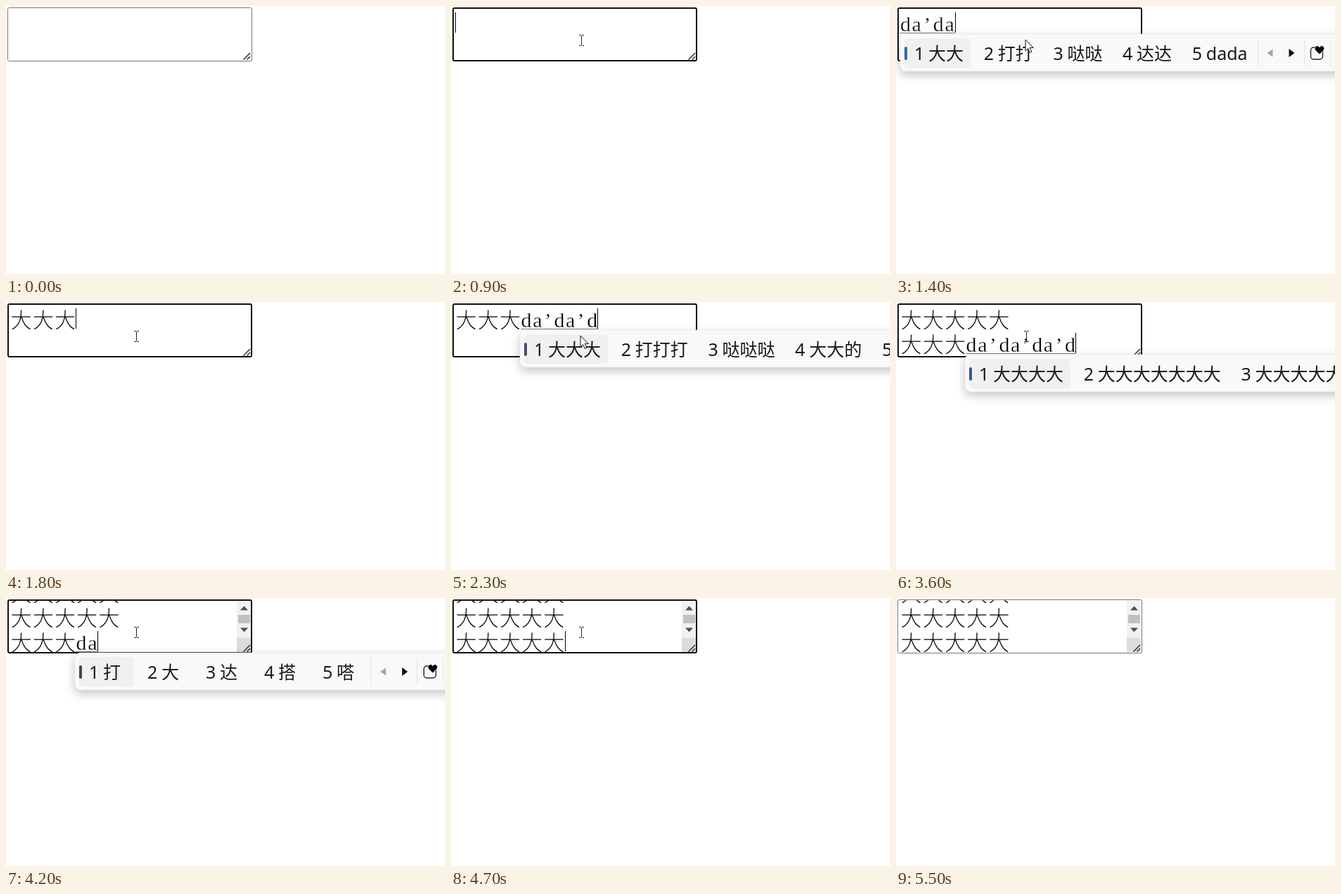
Animation of 624x382 px, one loop 5.6 s. Source, as an HTML page:

```html
<!DOCTYPE html>
<html lang="zh">
<head>
<meta charset="utf-8">
<style>
html, body { margin: 0; width: 100%; height: 100%; overflow: hidden; background: #fff; }
svg { display: block; }
/* A white outline thins the strokes of the typed text */
.han, .latin { stroke: #fff; }
.han { font: 31.2px "Noto Sans CJK SC", "Noto Sans CJK", sans-serif; stroke-width: 1.2px; }
.latin { font: 30px "Liberation Serif", serif; stroke-width: .4px; }
.pick { font: 25px "Noto Sans", "Noto Sans CJK SC", "Noto Sans CJK", sans-serif; fill: #1a1a1a; }
.panel { filter: drop-shadow(0 5px 7px rgba(0, 0, 0, .23)); }
</style>
</head>
<body>
<svg id="stage" width="624" height="382" viewBox="0 0 624 382"></svg>
<script>
const LOOP = 5600, STEP = 100;
const LEFT = 6, CELL = 15.6, ROW = 35, PER_ROW = 5;
const REST = [184, 48];
const stage = document.getElementById('stage');

// Each phrase: first key, ms per key, number of keys, commit time, characters added
const phrases = [
  { start: 1100, rate: 100, keys: 6, done: 1700, add: 3, accent: '#2b6ca8' },
  { start: 1900, rate: 88, keys: 10, done: 2800, add: 5, accent: '#47506a' },
  { start: 2880, rate: 104, keys: 10, done: 4000, add: 5, accent: '#2f5d9b' },
  { start: 4100, rate: 100, keys: 4, done: 4600, add: 2, accent: '#444' }
];

const da = n => '大'.repeat(n);
const long = n => [da(n), da(n + 3), da(n + 1)];
const picks = [
  ['的', '都', '对', '等', '到'],
  ['打', '大', '达', '搭', '嗒'],
  ['大的', '打的', '达到', '大地', '打倒'],
  ['大大', '打打', '哒哒', '达达', 'dada'],
  ['大大大', '打打打', '哒哒哒', '大大的', '达达的'],
  ['大大大', '打打打', '哒哒哒', '达达达', '大大打'],
  long(4), long(4), long(5), long(5)
];

const rect = (x, y, w, h, fill, extra = '') =>
  `<rect x="${x}" y="${y}" width="${w}" height="${h}" fill="${fill}" ${extra}/>`;
const path = (d, fill, extra = '') => `<path d="${d}" fill="${fill}" ${extra}/>`;

function spell(keys) {
  return Array.from({ length: keys }, (_, i) => i % 2 ? 'a' : i ? '’d' : 'd').join('');
}

// Places each character on the monospaced grid
function typed(text, kind, x, y) {
  const width = kind === 'han' ? 2 * CELL : CELL;
  const nudge = { a: 1, '’': 2 };
  const xs = [...text].map((c, i) => (x + i * width + (nudge[c] || 0)).toFixed(1));
  return text && `<text class="${kind}" x="${xs.join(' ')}" y="${y}">${text}</text>`;
}

function grip() {
  return path('M337.5 76.5L347 67M342.5 76.5L347 72', 'none', 'stroke="#3c3c3c" stroke-width="1.6"');
}

function scrollbar() {
  return rect(328, 4, 20, 53, '#f1f1f1') + rect(328, 57, 20, 20, '#dcdcdc') +
    rect(330, 24, 17, 12, '#c1c1c1') +
    path('M333 17.5l5.5-6 5.5 6zM333 42.5l5.5 6 5.5-6z', '#505050');
}

function box(state) {
  const { focus, hover, count, comp } = state;
  const scroll = count > 2 * PER_ROW ? 32 : 0;
  const row = count ? Math.floor((count - 1) / PER_ROW) : 0;
  const midY = r => 25 + r * ROW - scroll;
  let text = '';
  for (let r = 0; r <= row; r++) {
    text += typed(da(Math.min(PER_ROW, count - r * PER_ROW)), 'han', LEFT, midY(r) + 11.5);
  }
  const x = LEFT + (count - row * PER_ROW) * 2 * CELL, y = midY(row);
  const end = x + comp.length * CELL;
  text += typed(comp, 'latin', x, y + 11);
  if (comp) text += path(`M${x} ${y + 13.5}H${end}`, 'none', 'stroke="#000" stroke-dasharray="1 1"');
  if (focus) text += rect(Math.floor(end), y - 16, 1, 29, '#000');
  const frame = focus
    ? rect(3, 3, 346, 75, 'none', 'rx="2" stroke="#101010" stroke-width="2"')
    : rect(2.5, 2.5, 347, 76, 'none', `rx="2" stroke="${hover ? '#4f4f4f' : '#767676'}"`);
  const svg = `<clipPath id="inner"><rect x="3" y="3.5" width="${scroll ? 325 : 345}" height="73.5"/></clipPath>` +
    `<g clip-path="url(#inner)">${text}</g>` + (scroll ? scrollbar() : '') + grip() + frame;
  return { svg, x: count ? x - 1.6 : x, y };
}

function panel(x, y, list, accent) {
  x = Math.round(x);
  const top = y + 15;
  let left = x + 6, svg = '';
  list.forEach((word, i) => {
    const size = word === 'dada' ? 59 : 25 * word.length;
    const width = Math.max(78, 43.7 + size);
    if (!i) {
      svg += rect(left, top + 6, width, 42, '#f0f0f0', 'rx="5"') +
        rect(left, top + 18, 4, 19, accent, 'rx="2"');
    }
    svg += `<text class="pick" y="${top + 37}"><tspan x="${left + 14}">${i + 1}</tspan>` +
      `<tspan x="${left + 34}">${word}</tspan></text>`;
    left += width + 5;
  });
  const line = dx => path(`M${Math.round(left + dx) - .5} ${top + 8}v37`, 'none', 'stroke="#e4e4e4"');
  const mid = top + 27;
  svg += line(0) + line(66) + line(103) +
    path(`M${left + 13} ${mid}l8-5.5v11z`, '#a6a6a6') +
    path(`M${left + 52} ${mid}l-8-6v12z`, '#111') +
    rect(left + 75, mid - 8, 17, 17, 'none', 'rx="4" stroke="#222" stroke-width="1.4"') +
    path(`M${left + 87.5} ${mid + 2}l-6-6c-3-5 4-9 6-4c2-5 9-1 6 4z`, '#000', 'stroke="#f9f9f9" stroke-width=".8"');
  return `<g class="panel">${rect(x, top, 720, 53, '#f9f9f9', 'rx="8" stroke="#e6e6e6" stroke-width=".6"')}</g>` + svg;
}

function pointer([x, y], beam) {
  if (beam) {
    return path(`M${x - 2} ${y - 6.5}h2.5l1 1 1-1h2.5M${x - 2} ${y + 8.5}h2.5l1-1 1 1h2.5M${x + 1.5} ${y - 6}v14`,
      'none', 'stroke="#222"');
  }
  return path(`M${x} ${y}v16l3.7-3.5 2.6 6 2.6-1.1-2.6-5.9h5z`, '#fff', 'stroke="#111" stroke-linejoin="round"');
}

function mouseAt(t) {
  const mix = (a, b, k) => a.map((v, i) => v + (b[i] - v) * k);
  const ease = k => k * k * (3 - 2 * k);
  if (t < 100 || t >= 5400) return null;
  if (t < 600) return mix([571, 340], REST, ease((t - 100) / 500));
  if (t < 4900) return REST;
  return mix(REST, [605, 354], ease((t - 4800) / 500));
}

function draw(t) {
  const now = phrases.find(p => t >= p.start && t < p.done);
  const keys = now ? Math.min(now.keys, Math.floor((t - now.start) / now.rate) + 1) : 0;
  const count = phrases.reduce((sum, p) => sum + (t >= p.done ? p.add : 0), 0);
  const mouse = mouseAt(t);
  const hover = mouse && mouse[0] < 350 && mouse[1] < 79;
  const area = box({ focus: t >= 800 && t < 5500, hover, count, comp: spell(keys) });
  let svg = area.svg;
  if (now) svg += panel(area.x, area.y, picks[keys - 1], now.accent);
  const covered = now && mouse && mouse[1] > area.y + 15;
  if (mouse) svg += pointer(mouse, hover && !covered);
  stage.innerHTML = svg;
}

const begin = performance.now();
let last = -1;
function tick() {
  const t = Math.floor((performance.now() - begin) % LOOP / STEP) * STEP;
  if (t !== last) draw(last = t);
  requestAnimationFrame(tick);
}
tick();
</script>
</body>
</html>
```
